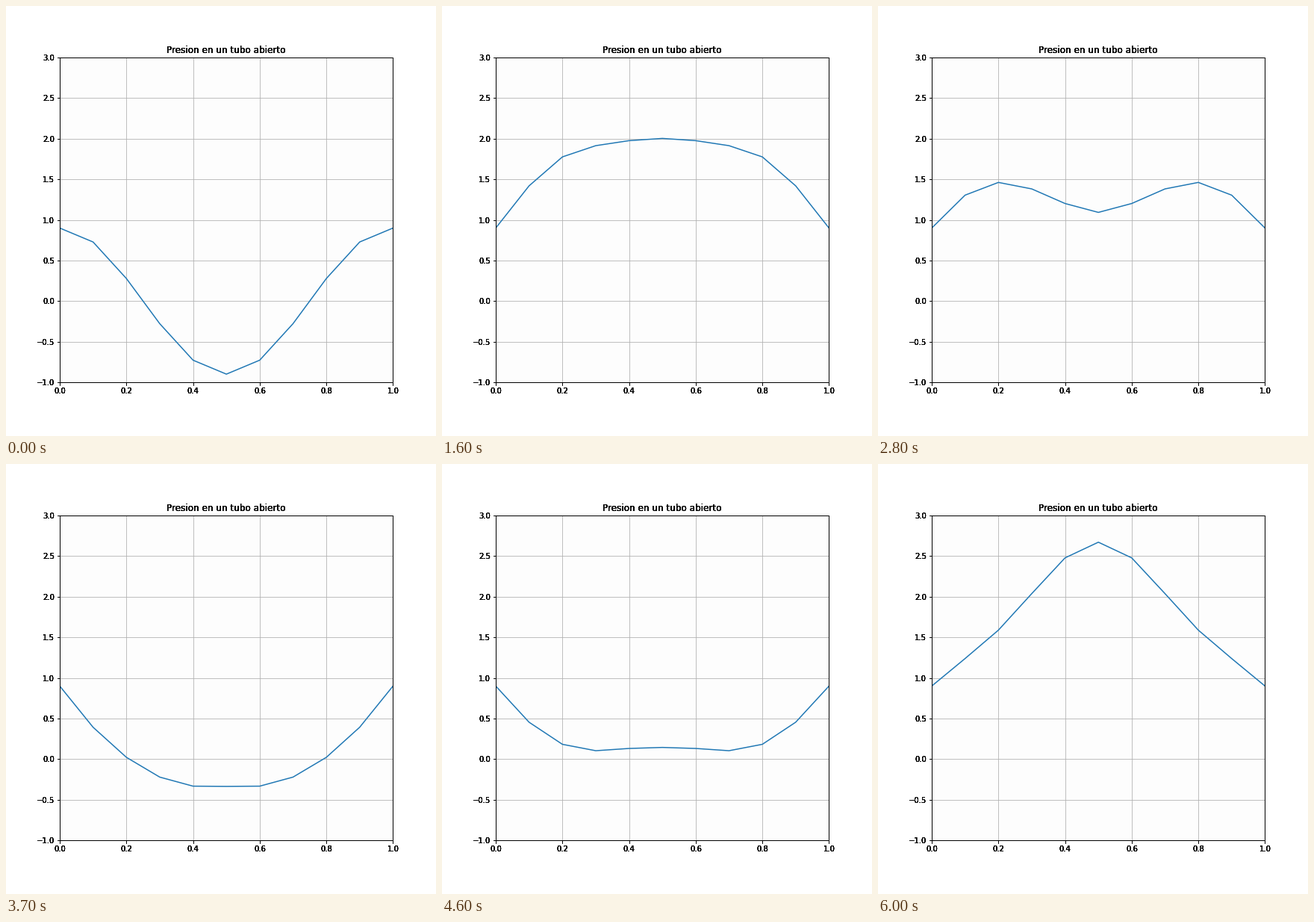
These frames come from a looping animation (576x576 px, 6100 ms). A matplotlib script:

```python
import numpy as np
import matplotlib.pyplot as plt
from matplotlib.animation import FuncAnimation

FRAMES = 61
INTERVAL = 100
COURANT = 0.5
OVERDRAW = 4
BOX = [0.125, 0.125, 0.775, 0.755]


def step_change(p):
    """Scaled second difference, zero at the fixed ends."""
    change = np.zeros_like(p)
    change[1:-1] = COURANT**2 * (p[2:] - 2 * p[1:-1] + p[:-2])
    return change


def solve(x):
    """Leapfrog solution of the wave equation, starting at rest."""
    start = 0.9 * np.cos(2 * np.pi * x)
    states = [start, start + step_change(start) / 2]
    while len(states) < FRAMES:
        states.append(2 * states[-1] - states[-2] + step_change(states[-1]))
    return states


def make_axes(fig, label):
    ax = fig.add_axes(BOX, label=label, facecolor="#fdfdfd")
    ax.set(xlim=(0, 1), ylim=(-1, 3))
    ax.set_xticks(np.linspace(0, 1, 6))
    ax.set_yticks(np.linspace(-1, 3, 9))
    ax.tick_params(labelsize=10)
    ax.set_title("Presion en un tubo abierto", fontsize=12, pad=6)
    return ax


plt.rcParams["font.family"] = "DejaVu Sans"
fig = plt.figure(figsize=(8, 8), dpi=72, facecolor="white")

ax = make_axes(fig, "main")
ax.grid(True, color="#b0b0b0", linewidth=0.8)

# Repeated drawing hardens the edges of the lettering and the frame.
for i in range(OVERDRAW):
    make_axes(fig, f"copy {i}").patch.set_visible(False)

x = np.linspace(0, 1, 11)
states = solve(x)
line, = ax.plot(x, states[0], color="#1f77b4", linewidth=1.5)


def update(i):
    line.set_ydata(states[i])
    return line,


anim = FuncAnimation(fig, update, frames=FRAMES, interval=INTERVAL,
                     repeat=True, repeat_delay=0)
plt.show()
```
